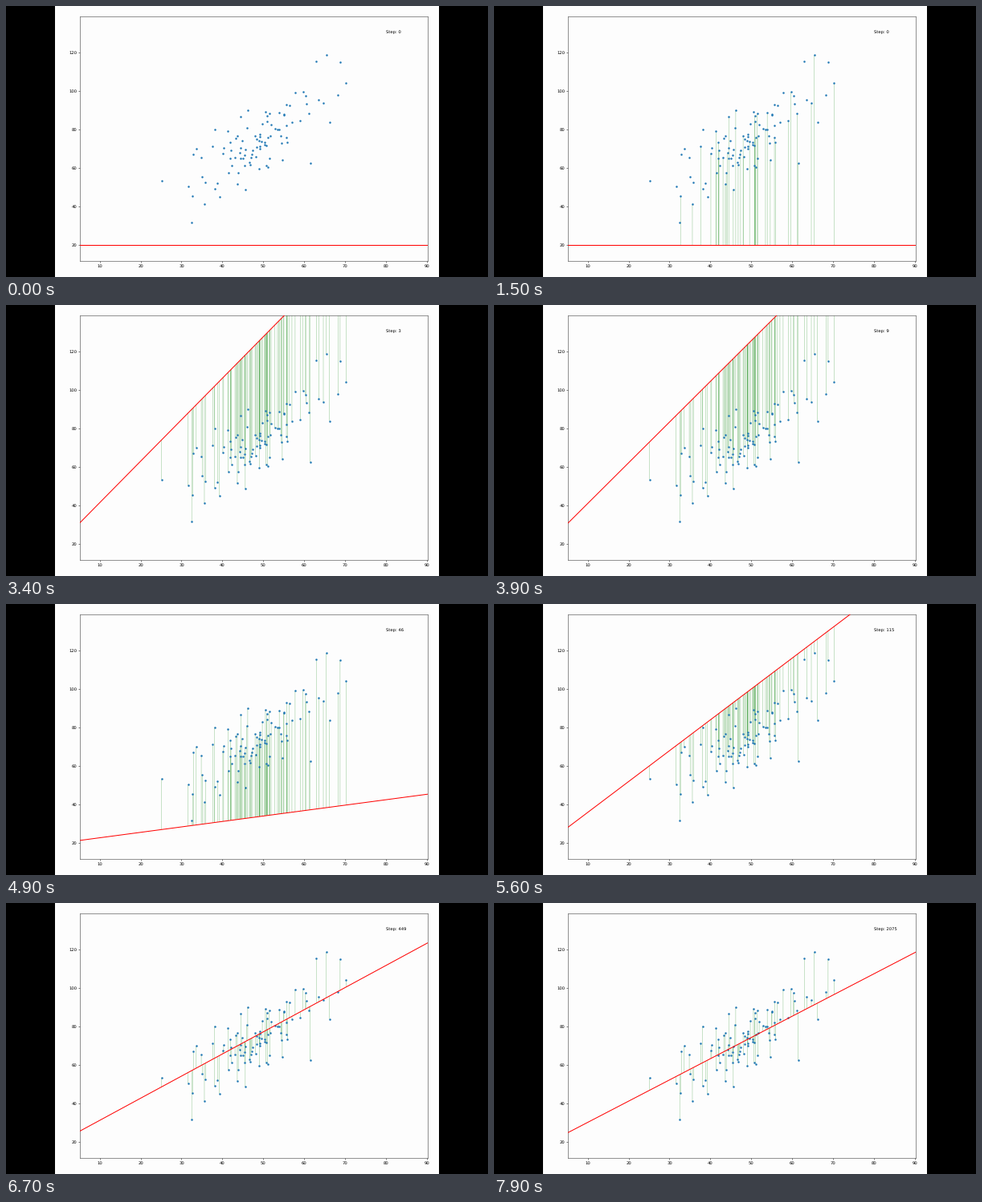
Animation of 600 by 338 pixels, one loop 8 s. Source, as a matplotlib script:

```python
import numpy as np
import matplotlib.pyplot as plt
from matplotlib.animation import FuncAnimation
from matplotlib.collections import LineCollection

W, H, DPI = 600, 338, 100
FRAMES, INTERVAL = 80, 100
PT = 72 / DPI  # points per pixel
PAPER = "0.992"

plt.rcParams.update({"font.family": "DejaVu Sans", "font.size": 5.2 * PT,
                     "text.hinting": "none", "toolbar": "None"})

# The cloud: mean and spread of x, and its best straight line.
MEAN, SPREAD = 48.96, 9.7
SLOPE, ICEPT = 1.322, 7.99
COUNT = 100

# Points on the rim of the cloud; the inside is filled at random.
LAST = [(68.8, 114.9), (68.3, 97.9), (25.1, 53.5)]
RIM = [(31.6, 50.4), (32.5, 31.7), (32.7, 45.6), (32.9, 67.2), (33.6, 69.9),
       (35.6, 41.4), (38.1, 80.2), (39.3, 44.9), (41.4, 79.1), (44.5, 86.6),
       (45.6, 48.8), (46.2, 90.1), (57.8, 99.1), (60.3, 97.4), (61.5, 62.6),
       (63.0, 115.2), (63.6, 95.2), (64.7, 93.6), (65.4, 118.6),
       (66.2, 83.9), (70.3, 104.3)]


def make_cloud(seed=7):
    """All points, in the order in which their bars appear."""
    rng = np.random.default_rng(seed)
    n = COUNT - len(RIM) - len(LAST)
    x = rng.triangular(33.5, 50, 62.5, n)
    y = SLOPE * x + ICEPT + rng.triangular(-18, 0, 18, n)
    mixed = rng.permutation(np.vstack([np.column_stack([x, y]), RIM]))
    return np.vstack([mixed, LAST])


def descend(steps):
    """Plain gradient descent with a rate close to the stability limit."""
    hess = np.array([[MEAN**2 + SPREAD**2, MEAN], [MEAN, 1]])
    rate = 1.9935 / np.linalg.eigvalsh(hess)[-1]
    best = np.array([SLOPE, ICEPT])
    path = [np.array([0.0, 20.0])]
    for _ in range(steps):
        path.append(path[-1] - rate * hess @ (path[-1] - best))
    return path


# The step counter grows roughly exponentially between these moments.
KEY_FRAMES = [30, 39, 49, 56, 67, 79]
KEY_STEPS = np.array([0, 9, 46, 115, 449, 2075])


def step_at(frame):
    level = np.interp(frame, KEY_FRAMES, np.log(KEY_STEPS + 5))
    return int(round(np.exp(level) - 5))


def bars_at(frame):
    return int(np.clip(5.12 * (frame - 7), 0, COUNT))


points = make_cloud()
path = descend(KEY_STEPS[-1])

fig = plt.figure(figsize=(W / DPI, H / DPI), dpi=DPI, facecolor="black")
fig.add_artist(plt.Rectangle((61 / W, 0), 478 / W, 1, color=PAPER,
                             lw=0, zorder=-1))

left, right, top, bottom = 92.3, 525.3, 12.8, 318.2
ax = fig.add_axes([left / W, 1 - bottom / H,
                   (right - left) / W, (bottom - top) / H], facecolor=PAPER)
ax.set_xlim(5.2, 90.31)
ax.set_ylim(11.73, 138.7)
ax.set_xticks(range(10, 91, 10))
ax.set_yticks(range(20, 121, 20))
ax.tick_params(length=1.9 * PT, width=0.5 * PT, pad=1.9 * PT)
for spine in ax.spines.values():
    spine.set(linewidth=0.6 * PT, edgecolor="0.3")

bars = LineCollection([], colors="green", linewidths=0.5 * PT, alpha=0.42,
                      zorder=1)
bars.set_snap(False)
ax.add_collection(bars, autolim=False)
ax.plot(*points.T, "o", color="tab:blue", ms=2.5 * PT, mew=0, zorder=2)
ends = np.array(ax.get_xlim())
fit, = ax.plot(ends, [20, 20], color="red", lw=PT, zorder=3)
label = ax.text(80, 130, "Step: 0")


def draw(frame):
    step = step_at(frame)
    slope, icept = path[step]
    fit.set_data(ends, slope * ends + icept)
    bars.set_segments([[(x, y), (x, slope * x + icept)]
                       for x, y in points[:bars_at(frame)]])
    label.set_text(f"Step: {step}")
    return bars, fit, label


anim = FuncAnimation(fig, draw, frames=FRAMES, interval=INTERVAL,
                     init_func=lambda: draw(0), repeat=True, repeat_delay=0)
plt.show()
```
